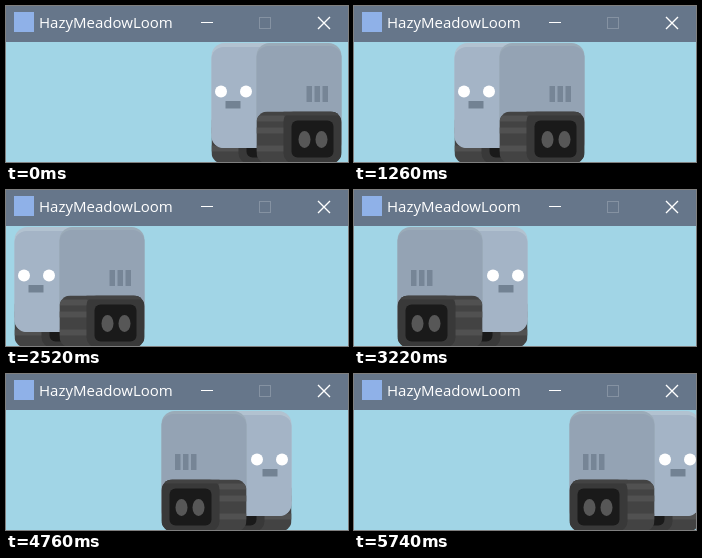
Write an HTML page with a canvas that moves like this. It is 342 by 156 pixels and loops after 5800 ms.

```html
<!DOCTYPE html>
<html lang="en">
<head>
<meta charset="utf-8">
<title>HazyMeadowLoom</title>
<style>
  html, body { margin: 0; width: 100%; height: 100%; overflow: hidden; background: #a1d5e6; }
  canvas { display: block; }
</style>
</head>
<body>
<canvas id="stage" width="342" height="156"></canvas>
<script>
const ctx = document.getElementById('stage').getContext('2d');
const LOOP = 5800, STEP = 140, ROBOT_W = 130, TURN = 19;

// [step, left edge of the robot]
const path = [[0, 205], [9, 100], [18, 8], [19, 2], [23, 43], [29, 104], [34, 155], [40, 214], [41, 215]];

function robotX(step) {
  const i = Math.max(1, path.findIndex(p => p[0] >= step));
  const [s0, x0] = path[i - 1], [s1, x1] = path[i];
  return Math.round(x0 + (x1 - x0) * (step - s0) / (s1 - s0));
}

function box(x, y, w, h, color, r = 0) {
  ctx.fillStyle = color;
  ctx.beginPath();
  ctx.roundRect(x, y, w, h, r);
  ctx.fill();
}

function oval(x, y, rx, ry, color) {
  ctx.fillStyle = color;
  ctx.beginPath();
  ctx.ellipse(x, y, rx, ry, 0, 0, Math.PI * 2);
  ctx.fill();
}

function line(color, width, ...segments) {
  ctx.strokeStyle = color;
  ctx.lineWidth = width;
  ctx.beginPath();
  for (const [x0, y0, x1, y1] of segments) {
    ctx.moveTo(x0, y0);
    ctx.lineTo(x1, y1);
  }
  ctx.stroke();
}

// Front track; the far one is the same shape, mostly hidden
function track(x, y) {
  ctx.save();
  ctx.beginPath();
  ctx.roundRect(x, y, 85, 52, 11);
  ctx.clip();
  box(x, y, 85, 52, '#434343');
  for (const dy of [4, 16, 34]) box(x, y + dy, 28, 6, '#515151');
  box(x + 27, y, 58, 52, '#393939', [10, 0, 0, 10]);
  box(x + 27, y, 58, 4, '#434343');
  box(x + 35, y + 9, 42, 37, '#1a1a1a', 6);
  ctx.restore();
  oval(x + 48, y + 28, 6, 8.5, '#575757');
  oval(x + 65, y + 28, 6, 8.5, '#575757');
}

// Drawn facing left; raised is 1 while the tracks are lifted, else 0
function robot(raised) {
  const trackY = 105.5 - 2.5 * raised;
  track(0, trackY);
  box(0, 37, 74, 105 + raised, '#b2c2d0', 13);
  box(0, 41, 74, 101 + raised, '#a4b4c6', 12);
  box(45, 37, 85, 112, '#9babb8', 13);
  box(45, 40, 85, 109, '#94a3b4', 12);
  oval(9.5, 85.5, 6, 6, '#fff');
  oval(34.5, 85.5, 6, 6, '#fff');
  box(14, 95, 15, 7.5, '#728293');
  for (const x of [95, 103, 111]) box(x, 80, 5.5, 16, '#768596');
  track(45, trackY);
}

function titleBar() {
  box(0, 0, 342, 36, '#66768a');
  box(8, 6, 20, 20, '#8fb1e8');
  ctx.fillStyle = '#fff';
  ctx.font = '15px "Open Sans", "Noto Sans", sans-serif';
  ctx.textBaseline = 'alphabetic';
  ctx.fillText('HazyMeadowLoom', 33, 22);
  line('#fff', 1, [195, 16.5, 207, 16.5]);
  line('#fff', 1.4, [312, 11, 324, 23], [324, 11, 312, 23]);
  ctx.strokeStyle = '#8592a2';
  ctx.lineWidth = 1;
  ctx.strokeRect(253.5, 11.5, 11, 11);
}

function draw(time) {
  const step = Math.floor((time % LOOP) / STEP);
  const x = robotX(step), left = step < TURN;
  // The tracks change height every 10 px driven
  const driven = left ? 205 - x : 203 + x;
  const raised = Math.floor((driven + 13) / 10) % 2 ? 0 : 1;

  box(0, 0, 342, 156, '#a1d5e6');
  ctx.save();
  ctx.translate(x + 0.5 + (left ? 0 : ROBOT_W), 0);
  ctx.scale(left ? 1 : -1, 1);
  robot(raised);
  ctx.restore();
  titleBar();
}

const start = performance.now();
function tick() {
  draw(performance.now() - start);
  requestAnimationFrame(tick);
}
tick();
</script>
</body>
</html>
```
